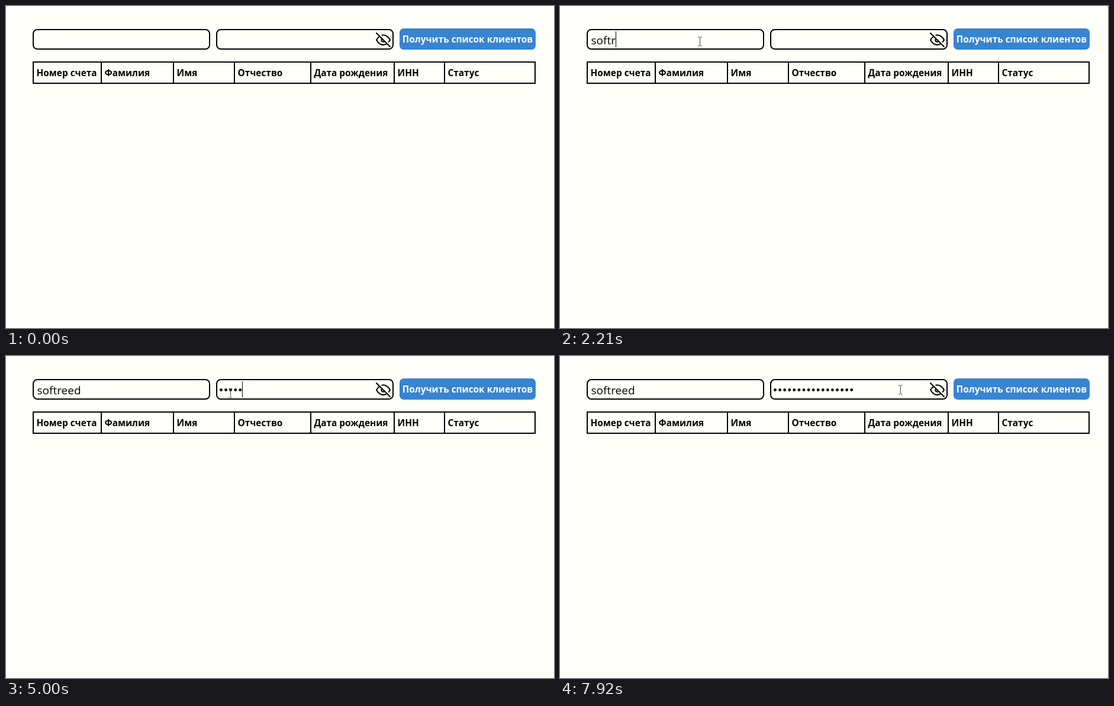
Recreate the animation shown at these times as an HTML page. Size 926 px wide and 546 px high, loop 8 s.

```html
<!DOCTYPE html>
<html lang="ru">
<head>
<meta charset="utf-8">
<title>Список клиентов</title>
<style>
  html, body { margin: 0; width: 100%; height: 100%; overflow: hidden; background: #fffffa; }
  svg { display: block; }
  text { font-family: "Open Sans", "Noto Sans", sans-serif; }
  .bold { font-size: 15.4px; font-weight: 700; }
  .box { fill: none; stroke: #000; stroke-width: 2; }
  .beam { fill: none; stroke: #444; }
</style>
</head>
<body>
<svg id="stage" width="926" height="546" viewBox="0 0 926 546">
  <rect class="box" x="46" y="40" width="298" height="33" rx="7"/>
  <rect class="box" x="356" y="40" width="298" height="33" rx="7"/>
  <rect x="665" y="38" width="230" height="36" rx="7" fill="#3784d0"/>
  <text class="bold" x="780" y="62" fill="#fff" text-anchor="middle">Получить список клиентов</text>
  <g class="box" stroke-linecap="round" stroke-linejoin="round" transform="translate(625 45) scale(1.0417)">
    <path d="M17.94 17.94A10.07 10.07 0 0 1 12 20c-7 0-11-8-11-8a18.45 18.45 0 0 1 5.06-5.94M9.9 4.24A9.12 9.12 0 0 1 12 4c7 0 11 8 11 8a18.5 18.5 0 0 1-2.16 3.19M14.12 14.12a3 3 0 1 1-4.24-4.24M1 1L23 23"/>
  </g>
  <rect class="box" x="46" y="95" width="848" height="36"/>
  <g id="header"></g>
  <text id="login" x="52.5" y="65" font-size="19"></text>
  <g id="dots"></g>
  <rect id="caret" y="43" width="1" height="27"/>
  <path id="cursor" class="beam" d="M-3 -7.5h2.5M1 -7.5h2.5M-3 7.5h2.5M1 7.5h2.5M.5 -7v14"/>
</svg>
<script>
const LOOP = 8000, BLINK = 500, DOT_STEP = 8.08;
const NAME = 'softreed';
const FOCUS_LOGIN = 830, FOCUS_PASSWORD = 3490;
const loginKeys = [1500, 1790, 1920, 2080, 2210, 2340, 2420, 2500];
const passwordKeys = [4460, 4580, 4670, 4880, 5000, 5130, 5420, 5550, 5850, 5880,
                      6500, 6580, 6670, 6790, 6880, 6960, 7090];
// Cursor stops: time, x, y
const stops = [
  [130, 330, 112], [500, 236, 60], [2920, 236, 60], [3210, 375, 58],
  [3420, 379, 63], [7500, 379, 63], [7920, 575, 57], [8000, 590, 57]
];
const columns = [
  [45, 'Номер счета'], [160, 'Фамилия'], [282, 'Имя'], [385, 'Отчество'],
  [514, 'Дата рождения'], [655, 'ИНН'], [740, 'Статус']
];

const $ = id => document.getElementById(id);
const login = $('login'), dots = $('dots'), caret = $('caret'), cursor = $('cursor');

function add(parent, tag, attrs, text = '') {
  const el = document.createElementNS('http://www.w3.org/2000/svg', tag);
  for (const key in attrs) el.setAttribute(key, attrs[key]);
  el.textContent = text;
  return parent.appendChild(el);
}
const show = (el, visible) => el.setAttribute('visibility', visible ? 'visible' : 'hidden');

for (const [x, label] of columns) {
  add($('header'), 'rect', { x, y: 94, width: 2, height: 38 });
  add($('header'), 'text', { class: 'bold', x: x + 6.5, y: 119 }, label);
}
passwordKeys.forEach((_, i) =>
  add(dots, 'circle', { cx: 363.5 + i * DOT_STEP, cy: 57.5, r: 2.4 }));

function cursorAt(t) {
  const i = Math.max(1, stops.findIndex(stop => stop[0] > t));
  const [t0, x0, y0] = stops[i - 1], [t1, x1, y1] = stops[i];
  const k = Math.max(0, (t - t0) / (t1 - t0));
  const ease = i === stops.length - 1 ? k : k * k * (3 - 2 * k);
  return [x0 + (x1 - x0) * ease, y0 + (y1 - y0) * ease].map(Math.round);
}

function draw(now) {
  const t = now % LOOP;
  const pressed = keys => keys.filter(key => key <= t).length;
  const dotCount = pressed(passwordKeys);
  login.textContent = NAME.slice(0, pressed(loginKeys));
  [...dots.children].forEach((dot, i) => show(dot, i < dotCount));

  const inPassword = t >= FOCUS_PASSWORD;
  const lastInput = Math.max(...[FOCUS_LOGIN, FOCUS_PASSWORD, ...loginKeys, ...passwordKeys]
    .filter(time => time <= t));
  const caretX = inPassword ? 359 + dotCount * DOT_STEP : 53 + login.getComputedTextLength();
  caret.setAttribute('x', Math.round(caretX));
  show(caret, t >= FOCUS_LOGIN && Math.floor((t - lastInput) / BLINK) % 2 === 0);

  cursor.setAttribute('transform', `translate(${cursorAt(t)})`);
  show(cursor, t >= stops[0][0]);
  requestAnimationFrame(() => draw(performance.now() - start));
}
const start = performance.now();
draw(0);
</script>
</body>
</html>
```
